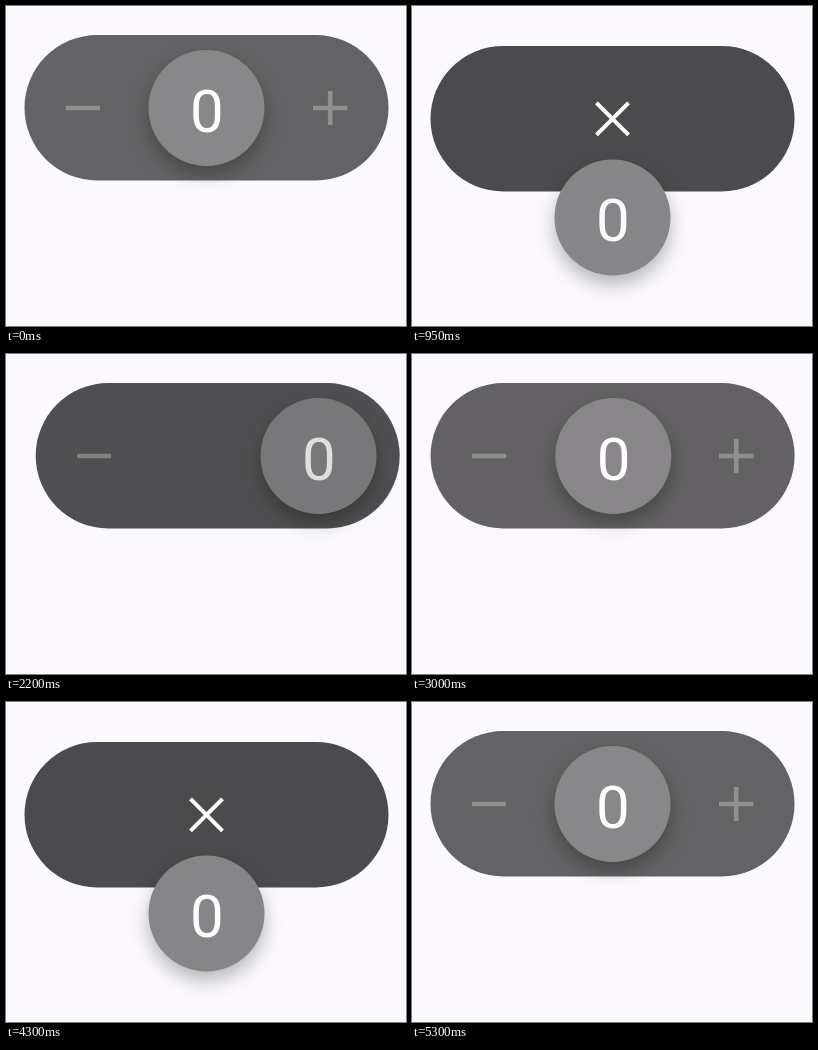
Recreate the animation shown at these times as an HTML page. Size 400 by 320 pixels, loop 5.45 s.

```html
<!DOCTYPE html>
<html lang="en">
<head>
<meta charset="utf-8">
<title>Sliding counter</title>
<style>
  html, body { margin: 0; width: 100%; height: 100%; overflow: hidden; background: #fbf9fd; }
  svg { display: block; width: 400px; height: 320px; }
  .icon { fill: none; stroke: #fff; stroke-width: 4.6; }
  #close { stroke-width: 4; }
  #knob { filter: drop-shadow(0 9px 9px rgba(0, 0, 0, .27)); }
  text { font: 400 60px Roboto, sans-serif; text-anchor: middle; }
</style>
</head>
<body>
<svg viewBox="0 0 400 320">
  <g id="button">
    <rect id="pill" x="18.5" y="29" width="364" height="145.5" rx="72.75"/>
    <path id="signs" class="icon" d="M60 102h34M307 102h34.5M324.2 85v34"/>
    <path id="close" class="icon" d="M184.5 86l32 32m0-32l-32 32"/>
  </g>
  <g id="knob">
    <circle id="disc" cx="200.5" cy="102" r="58"/>
    <text id="count" x="200.8" y="125.5">0</text>
  </g>
</svg>
<script>
const LOOP = 5450, REST = 760;
const MAX_X = 112, MAX_Y = 109.5;
const [button, pill, signs, close, knob, disc, count] =
  ['button', 'pill', 'signs', 'close', 'knob', 'disc', 'count'].map(id => document.getElementById(id));

const drags = [
  { axis: 'y', from: 280, to: 800, release: 1040 },
  { axis: 'x', from: 1980, to: 2190, release: 2250 },
  { axis: 'y', from: 3380, to: 4220, release: 4530 }
];

const clamp = v => Math.min(1, Math.max(0, v));
const smooth = v => v * v * (3 - 2 * v);

// Underdamped spring from 1 to 0
function spring(ms) {
  if (ms > REST) return 0;
  const t = ms / 1000, decay = 6, freq = 10.39;
  return Math.exp(-decay * t) * (Math.cos(freq * t) + decay / freq * Math.sin(freq * t));
}

function pull({ from, to, release }, t) {
  if (t < from) return 0;
  return t < release ? smooth(clamp((t - from) / (to - from))) : spring(t - release);
}

// Grey levels for rest, full sideways pull and full downward pull
function shade(rest, side, down, px, py) {
  const v = rest + (side - rest) * px + (down - rest) * py;
  return `rgb(${v},${v - 1.5},${v + .5})`;
}

function draw(t) {
  const p = { x: 0, y: 0 };
  for (const d of drags) p[d.axis] += pull(d, t);
  const x = p.x * MAX_X, y = p.y * MAX_Y;
  const px = clamp(Math.abs(p.x)), py = clamp(p.y);

  button.setAttribute('transform', `translate(${x * .1} ${y * .1})`);
  knob.setAttribute('transform', `translate(${x} ${y})`);
  pill.setAttribute('fill', shade(99, 79, 75, px, py));
  disc.setAttribute('fill', shade(136, 120, 134, px, py));
  count.setAttribute('fill', shade(255, 223, 252, px, py));
  signs.setAttribute('opacity', .29 * (1 - py));
  close.setAttribute('opacity', py);
}

function tick() {
  draw(performance.now() % LOOP);
  requestAnimationFrame(tick);
}
tick();
</script>
</body>
</html>
```
